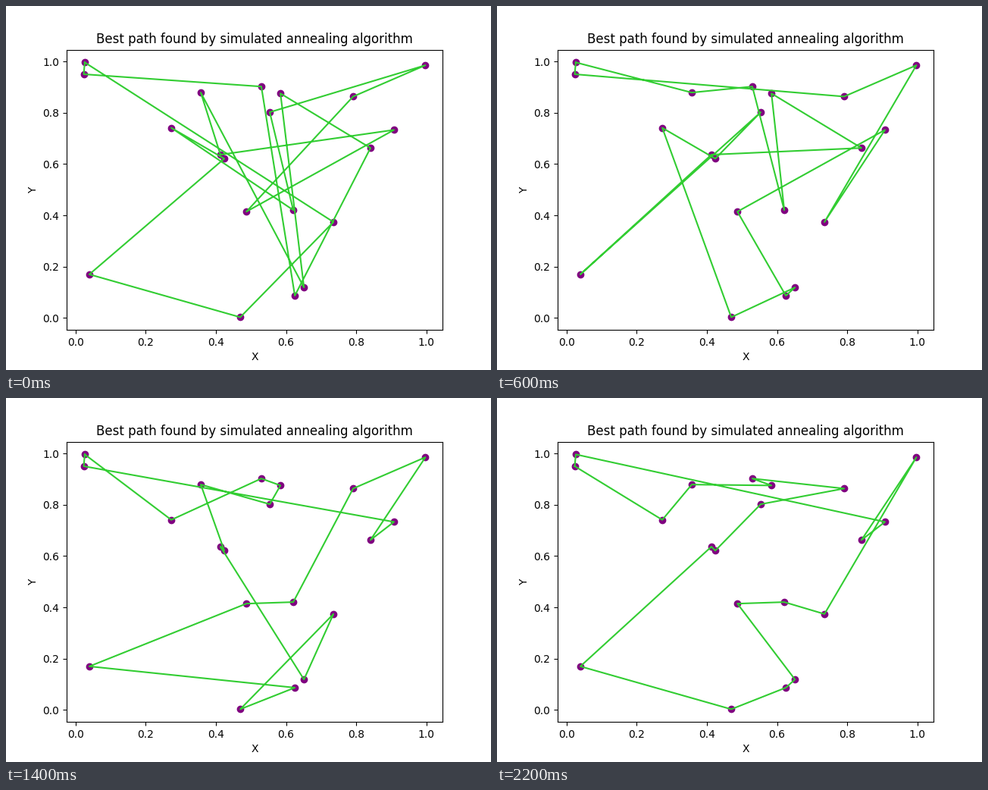
Animation of 640x480 px, one loop 2300 ms. Source, as a matplotlib script:

```python
import matplotlib.pyplot as plt
from matplotlib.animation import FuncAnimation

CITIES = {
    "A": (0.0265, 0.9960), "B": (0.0235, 0.9500), "C": (0.3570, 0.8785),
    "D": (0.5295, 0.9020), "E": (0.5840, 0.8750), "F": (0.5535, 0.8020),
    "G": (0.7910, 0.8630), "H": (0.9970, 0.9850), "I": (0.9075, 0.7330),
    "J": (0.8405, 0.6625), "K": (0.2730, 0.7410), "L": (0.4130, 0.6365),
    "M": (0.4240, 0.6210), "N": (0.4870, 0.4145), "O": (0.6205, 0.4205),
    "P": (0.7350, 0.3740), "Q": (0.6510, 0.1190), "R": (0.6250, 0.0870),
    "S": (0.4695, 0.0030), "T": (0.0395, 0.1700),
}

# Closed tours reached at certain steps of the search
TOURS = {
    0: "APSTMKOFHGNILCQEJRDB",
    2: "ASPOMKEFHQNDGCLTJRIB",
    6: "ACDOEJLTFMKSQRNIPHGB",
    10: "BCDFEJLTNMKSQRPIOHGA",
    12: "ACFEDKQLMPSRTNOGHJIB",
    16: "AKDEFCMLGTSRQNOPHJIB",
    18: "BLMKCDGEFTSRQNOPHJIA",
    22: "BKCEDGFMLTSRQNOPHJIA",
}
STEPS = 23


def swap_states(start, goal):
    """All tours met while swapping cities one pair at a time."""
    tour = list(start)
    states = [tour[:]]
    for i, city in enumerate(goal):
        if tour[i] != city:
            j = tour.index(city)
            tour[i], tour[j] = tour[j], tour[i]
            states.append(tour[:])
    return states


def tour_at(step):
    if step in TOURS:
        return TOURS[step]
    before = max(k for k in TOURS if k < step)
    after = min(k for k in TOURS if k > step)
    states = swap_states(TOURS[before], TOURS[after])
    part = (step - before) / (after - before)
    return states[round(part * (len(states) - 1))]


def tour_xy(step):
    tour = list(tour_at(step))
    return zip(*(CITIES[c] for c in tour + tour[:1]))


fig, ax = plt.subplots(figsize=(6.4, 4.8), dpi=100)
ax.scatter(*zip(*CITIES.values()), color="purple")
path, = ax.plot(*tour_xy(0), color="limegreen")
ax.set_title("Best path found by simulated annealing algorithm")
ax.set_xlabel("X")
ax.set_ylabel("Y")


def update(step):
    path.set_data(*tour_xy(step))
    return path,


anim = FuncAnimation(fig, update, frames=STEPS, interval=100,
                     repeat=True, repeat_delay=0)
plt.show()
```
